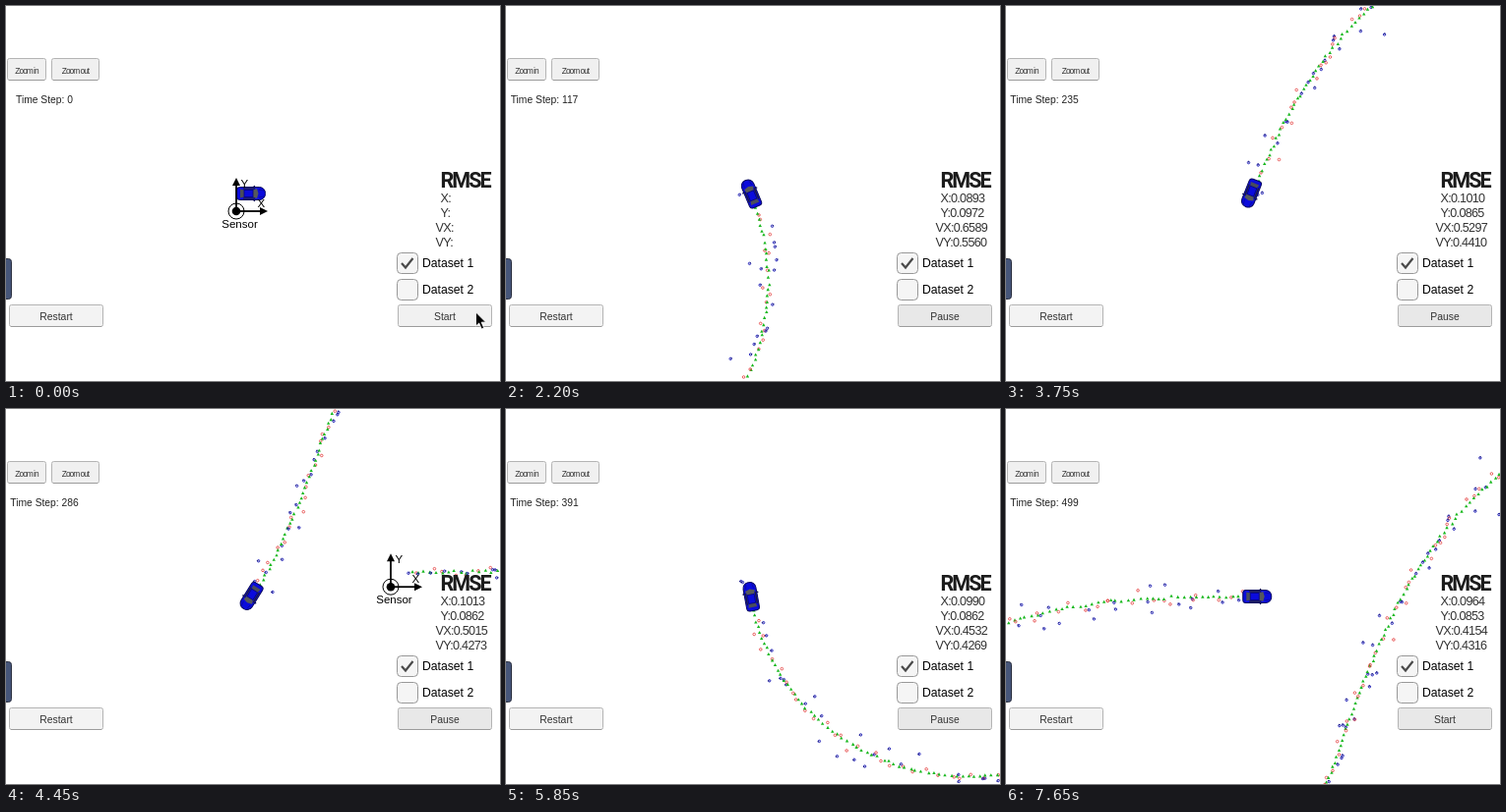
Animation of 502 by 382 pixels, one loop 7700 ms. Source, as an HTML page with a canvas:

```html
<!DOCTYPE html>
<html lang="en">
<head>
<meta charset="utf-8">
<title>Sensor fusion tracking</title>
<style>
  html, body { margin: 0; width: 100%; height: 100%; overflow: hidden; background: #fff; }
  canvas { display: block; }
</style>
</head>
<body>
<canvas id="stage" width="502" height="382"></canvas>
<script>
const W = 502, H = 382, LOOP = 7700, TICK = 50, LAST = 499;
const ctx = document.getElementById('stage').getContext('2d');
const SANS = '"Liberation Sans", Arial, sans-serif';
const HEADING = 'Roboto, "Liberation Sans", sans-serif';
const CAR = { x: 249, y: 191 };

// time (ms) -> simulation step
const PACE = [[0, 0], [600, 0], [1050, 31], [2200, 117], [3750, 235],
  [5150, 336], [6500, 443], [7250, LAST], [LOOP, LAST]];

// step -> RMSE of X, Y, VX, VY
const ERRORS = [
  [1, .0620, .0710, .4100, .2200], [8, .1130, .0790, 1.7420, .6180],
  [31, .1014, .0853, 1.1322, .7336], [117, .0893, .0972, .6589, .5560],
  [235, .1010, .0865, .5297, .4410], [336, .1015, .0860, .4739, .4138],
  [443, .0966, .0864, .4336, .4393], [LAST, .0964, .0853, .4154, .4316]];

function sample(keys, at, column) {
  let i = 1;
  while (i < keys.length - 1 && keys[i][0] < at) i++;
  const a = keys[i - 1], b = keys[i];
  const f = Math.min(1, Math.max(0, (at - a[0]) / (b[0] - a[0])));
  return a[column] + (b[column] - a[column]) * f;
}

function makeRandom(seed) {
  return () => {
    seed = (Math.imul(seed, 1664525) + 1013904223) >>> 0;
    return (seed + 1) / 4294967297;
  };
}
const random = makeRandom(2024);
const gauss = () =>
  Math.sqrt(-2 * Math.log(random())) * Math.cos(2 * Math.PI * random());

// Yaw and speed each swing through one cosine, which gives the figure-eight path.
const SWING = 2.188;
const phase = k => Math.cos(2 * Math.PI * k / 500);
const yawAt = k => SWING * (1 - phase(k));
const speedAt = k => 6 + 0.24 * phase(k);

// World units are pixels, y up, with the sensor at the origin.
const path = [{ x: 15, y: 15 }];
for (let k = 0; k < LAST; k++) {
  const yaw = yawAt(k + 0.5), speed = speedAt(k + 0.5), p = path[k];
  path.push({ x: p.x + speed * Math.cos(yaw), y: p.y + speed * Math.sin(yaw) });
}

const trail = path.map((p, k) => {
  const estimate = { x: p.x + gauss() * 0.7, y: p.y + gauss() * 0.7 };
  const lidar = k % 2 === 0;
  if (lidar) {
    return { estimate, lidar, reading: { x: p.x + gauss() * 3.6, y: p.y + gauss() * 3.6 } };
  }
  const range = Math.hypot(p.x, p.y) + gauss() * 7;
  const bearing = Math.atan2(p.y, p.x) + gauss() * 0.03;
  return { estimate, lidar, bearing,
    reading: { x: range * Math.cos(bearing), y: range * Math.sin(bearing) } };
});

function text(str, x, y, size, { align = 'left', color = '#000', weight = 'normal',
  family = SANS, tracking = 0 } = {}) {
  ctx.font = `${weight} ${size}px ${family}`;
  ctx.letterSpacing = tracking + 'px';
  ctx.textAlign = align;
  ctx.fillStyle = color;
  ctx.fillText(str, x, y);
}

function box(x, y, w, h, r, fill, stroke) {
  ctx.beginPath();
  ctx.roundRect(x + 0.5, y + 0.5, w - 1, h - 1, r);
  ctx.fillStyle = fill;
  ctx.fill();
  ctx.strokeStyle = stroke;
  ctx.lineWidth = 1;
  ctx.stroke();
}

function polygon(points, fill) {
  ctx.beginPath();
  points.forEach(([x, y]) => ctx.lineTo(x, y));
  ctx.closePath();
  ctx.fillStyle = fill;
  ctx.fill();
}

function ring(x, y, r, color, width) {
  ctx.beginPath();
  ctx.arc(x, y, r, 0, 2 * Math.PI);
  ctx.strokeStyle = color;
  ctx.lineWidth = width;
  ctx.stroke();
}

function line(x1, y1, x2, y2, color, width) {
  ctx.beginPath();
  ctx.moveTo(x1, y1);
  ctx.lineTo(x2, y2);
  ctx.strokeStyle = color;
  ctx.lineWidth = width;
  ctx.stroke();
}

function drawSensor(x, y) {
  line(x, y, x, y - 28, '#000', 1.8);
  line(x, y, x + 27, y, '#000', 1.8);
  polygon([[x - 4, y - 26], [x + 4, y - 26], [x, y - 34]], '#000');
  polygon([[x + 24, y - 4], [x + 24, y + 4], [x + 32, y]], '#000');
  ring(x, y, 8, '#000', 1);
  ctx.beginPath();
  ctx.arc(x, y, 4.3, 0, 2 * Math.PI);
  ctx.fillStyle = '#000';
  ctx.fill();
  text('Y', x + 4.5, y - 24, 11.5);
  text('X', x + 21.5, y - 4, 11.5);
  text('Sensor', x + 3.5, y + 17, 11.5, { align: 'center' });
}

function drawTrail(step, toScreen) {
  for (let k = 1; k <= step; k++) {
    const { estimate, lidar, reading, bearing } = trail[k];
    const m = toScreen(reading), e = toScreen(estimate);
    if (lidar) {
      ring(m.x, m.y, 1.3, '#e43a3a', 0.8);
    } else {
      ring(m.x, m.y, 1.2, '#1414b4', 0.9);
      line(m.x, m.y, m.x + 1.8 * Math.cos(bearing), m.y - 1.8 * Math.sin(bearing), '#101070', 0.8);
    }
    polygon([[e.x - 1.7, e.y + 1.4], [e.x + 1.7, e.y + 1.4], [e.x, e.y - 1.7]], '#18b81e');
  }
}

function drawCar(x, y, yaw) {
  ctx.save();
  ctx.translate(x, y);
  ctx.rotate(-yaw);
  for (const side of [-1, 1]) line(4, side * 6, 3, side * 8, '#0a0a50', 1.4);
  box(-15, -7, 30, 14, [3, 6, 6, 3], '#0b0bdc', '#07075e');
  polygon([[-11, -4.5], [-7, -3.5], [-7, 3.5], [-11, 4.5]], '#4a4d5c');
  polygon([[2, -3.5], [6, -5], [7.5, 0], [6, 5], [2, 3.5]], '#56595c');
  for (const side of [-1, 1]) {
    line(-8, side * 5, 4, side * 5, '#20203c', 1.3);
    line(8, side * 4, 13, side * 3, '#0808a0', 0.8);
  }
  ctx.strokeStyle = '#06067c';
  ctx.lineWidth = 0.8;
  ctx.strokeRect(-7, -3.5, 9, 7);
  ctx.restore();
}

function button(label, x, y, w, fill, size, tracking = 0) {
  box(x, y, w, 23, 2, fill, '#b4b4b4');
  line(x + 2, y + 22.5, x + w - 2, y + 22.5, '#9c9c9c', 1);
  text(label, x + w / 2, y + 15.5, size, { align: 'center', color: '#333', tracking });
}

function checkbox(label, y, checked) {
  box(397, y, 22, 22, 4, '#f5f5f5', '#989898');
  if (checked) {
    ctx.beginPath();
    ctx.moveTo(402, y + 11);
    ctx.lineTo(406, y + 15.5);
    ctx.lineTo(413.5, y + 6);
    ctx.strokeStyle = '#4a4a4a';
    ctx.lineWidth = 2.2;
    ctx.stroke();
  }
  text(label, 423, y + 15, 12.2);
}

function drawPanel(step, running, fresh) {
  button('Zoom in', 1, 53, 40, '#f0f0f0', 8.4, -1);
  button('Zoom out', 46, 53, 49, '#f0f0f0', 8.4, -1);
  text('Time Step: ' + step, 39, 99, 10.3, { align: 'center', color: '#222' });

  box(-6, 257, 12, 42, 3, '#46567a', '#2b3040');
  button('Restart', 3, 304, 96, '#f3f3f3', 10.4);
  button(running ? 'Pause' : 'Start', 398, 304, 96, fresh ? '#f1f1f1' : '#e8e8e8', 10.4);
  checkbox('Dataset 1', 251, true);
  checkbox('Dataset 2', 278, false);

  text('RMSE', 441.5, 185, 21.5,
    { weight: 'bold', family: HEADING, color: '#1c1c1c', tracking: -1.9 });
  ['X:', 'Y:', 'VX:', 'VY:'].forEach((label, i) => {
    const value = step ? sample(ERRORS, step, i + 1).toFixed(4) : '';
    text(label + value, i < 2 ? 441.5 : 436.5, 200 + 15 * i, 12.6,
      { color: '#333', tracking: -0.7 });
  });
}

function drawCursor(x, y) {
  const shape = [[0, 0], [0, 14], [3.2, 11], [5.8, 17], [8.2, 16], [5.6, 10.2], [10, 10]];
  polygon(shape.map(([dx, dy]) => [x + dx, y + dy]), '#000');
  ctx.strokeStyle = '#fff';
  ctx.lineWidth = 0.8;
  ctx.stroke();
}

function draw(ms) {
  const held = ms >= 5450 && ms < 5600 ? 5450 : ms;
  const step = Math.round(sample(PACE, held, 1));
  const fresh = ms < 550;

  // The camera stays one step short when the run ends.
  const focus = path[Math.min(step, LAST - 1)];
  const drop = 3 * (1 - (step / LAST) ** 4);
  const toScreen = p => ({ x: CAR.x + p.x - focus.x, y: CAR.y + drop - p.y + focus.y });
  const origin = toScreen({ x: 0, y: 0 });

  ctx.fillStyle = '#fff';
  ctx.fillRect(0, 0, W, H);
  drawTrail(step, toScreen);
  drawCar(CAR.x + (path[step].x - focus.x), CAR.y, yawAt(step));
  drawSensor(origin.x, origin.y);
  drawPanel(step, !fresh && step < LAST, fresh);
  if (fresh) drawCursor(477.5, 312);
}

function frame() {
  const ms = performance.now() % LOOP;
  draw(Math.floor(ms / TICK) * TICK);
  requestAnimationFrame(frame);
}
frame();
</script>
</body>
</html>
```
